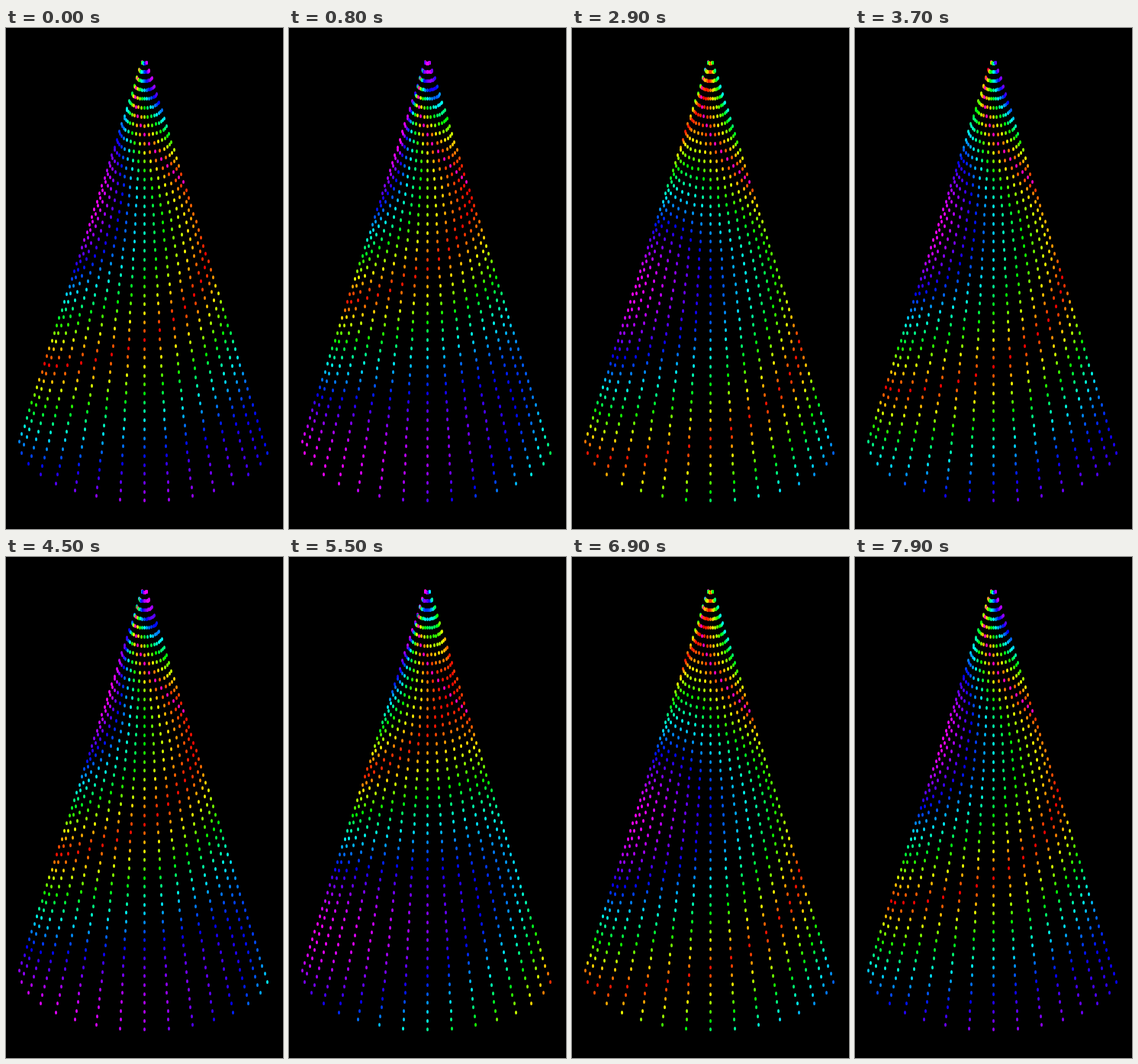
These frames come from a looping animation (363 by 656 pixels, 8000 ms). An HTML page with a canvas:

```html
<!DOCTYPE html>
<html>
<head>
<meta charset="utf-8">
<title>Light tree</title>
<style>
html, body { margin: 0; width: 100%; height: 100%; overflow: hidden; background: #000; }
canvas { display: block; }
</style>
</head>
<body>
<canvas id="stage" width="363" height="656"></canvas>
<script>
const ctx = document.getElementById('stage').getContext('2d');
const STRINGS = 16, ROWS = 50, STEP = 100, CYCLE = 40;

// Butterfly function: x counts strings from the left, y counts lights from the tip
function color(x, y, step) {
  if (x === y) return '#ff00c0';
  const wave = Math.sin(Math.PI * ((x + y) / 41 + (step + 2) / CYCLE));
  const h = Math.abs((x * x - y * y) * wave) / (x * x + y * y);
  return `hsl(${300 * h}, 100%, 50%)`;
}

// Lights hang on the front half of a cone
function place(x, y) {
  const angle = (x - 8) * Math.PI / STRINGS;
  const size = (y + 1) / ROWS;
  return [
    Math.round(181 + 164 * size * Math.sin(angle)),
    Math.round(44.2 + 10.135 * y + 77.5 * size * Math.cos(angle))
  ];
}

function draw(step) {
  ctx.fillStyle = '#000';
  ctx.fillRect(0, 0, 363, 656);
  for (let x = 0; x < STRINGS; x++) {
    for (let y = 0; y < ROWS; y++) {
      const [px, py] = place(x, y);
      ctx.fillStyle = color(x, y, step);
      ctx.beginPath();
      ctx.ellipse(px + 0.5, py + 0.5, 1.5, 2.5, 0, 0, 2 * Math.PI);
      ctx.fill();
    }
  }
}

const start = performance.now();
function tick() {
  draw(Math.floor((performance.now() - start) / STEP) % CYCLE);
  requestAnimationFrame(tick);
}
tick();
</script>
</body>
</html>
```
